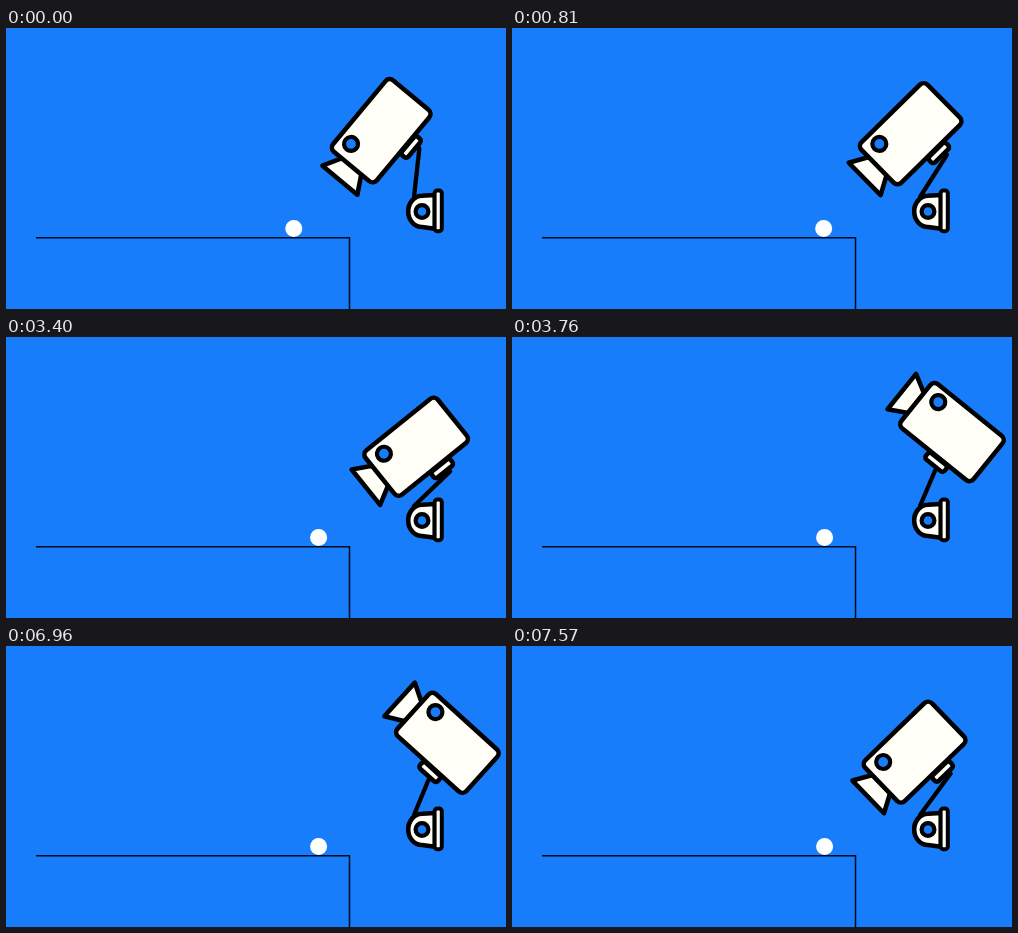
Recreate the animation shown at these times as an HTML page. Size 500 by 281 pixels, loop 8 s.

```html
<!DOCTYPE html>
<html lang="en">
<head>
<meta charset="utf-8">
<title>Camera and ball</title>
<style>
  html, body { margin: 0; width: 100%; height: 100%; overflow: hidden; background: #187dfa; }
  svg { display: block; width: 100vw; height: 100vh; }
  .ink { fill: #fffff8; stroke: #000; stroke-width: 4.6; stroke-linejoin: round; }
  .eye { fill: #187dfa; stroke: #000; stroke-width: 4.2; }
  .edge { fill: none; stroke: #020a1c; stroke-width: 1.5; }
  #arm { stroke: #000; stroke-width: 4.3; stroke-linecap: round; }
</style>
</head>
<body>
<svg viewBox="0 0 500 281">
  <path class="edge" d="M30 209.8H343.5V281"/>
  <circle id="ball" cy="200.4" r="8.5" fill="#fff"/>
  <line id="arm" x1="408" y1="169"/>
  <g id="base">
    <path class="ink" d="M429 167L416 167.8A13.8 15.6 0 0 0 416 199L429 200.8Z"/>
    <rect class="ink" x="428.6" y="162.6" width="7.2" height="40.6" rx="2.6" style="stroke-width:4"/>
    <circle class="eye" cx="416" cy="183.5" r="6.4"/>
  </g>
  <g id="cam">
    <path class="ink" d="M-64.5 -22.7L-46 -12.5V12.5L-64.5 22.7Z"/>
    <rect class="ink" x="-46.4" y="-28.4" width="92.8" height="56.8" rx="5.5"/>
    <circle class="eye" cx="-29.5" cy="-14.7" r="7"/>
    <rect class="ink" x="-5.4" y="29.3" width="24" height="8.2" rx="3"/>
  </g>
</svg>
<script>
const LOOP = 8000;
const $ = id => document.getElementById(id);
const ball = $('ball'), arm = $('arm'), cam = $('cam');

const sine = p => (1 - Math.cos(Math.PI * p)) / 2;
const cubic = p => p < .5 ? 4 * p ** 3 : 1 - 4 * (1 - p) ** 3;
const out = p => 1 - (1 - p) ** 2.5;
const clamp = p => Math.min(1, Math.max(0, p));
const mix = (a, b, p) => a + (b - a) * p;

// Camera moves: start, end, easing, pose reached [x, y, degrees]
const rest = [375.2, 102.7, -50.2];
const moves = [
  [80, 1080, sine, [403.4, 106.3, -43.4]],
  [2050, 2440, sine, [410.1, 109.7, -38.9]],
  [3380, 3760, cubic, [440, 95.1, 38.9]],
  [4960, 5330, sine, [441.4, 96.8, 42.2]],
  [6940, 7570, cubic, [402.6, 106.1, -44]]
];

function poseAt(t) {
  let pose = rest;
  for (const [start, end, ease, to] of moves) {
    if (t < start) break;
    const p = ease(clamp((t - start) / (end - start)));
    pose = pose.map((v, i) => mix(v, to[i], p));
  }
  return pose;
}

function draw(t) {
  const [x, y, deg] = poseAt(t);
  const a = deg * Math.PI / 180, c = Math.cos(a), s = Math.sin(a);
  cam.setAttribute('transform', `translate(${x} ${y}) rotate(${deg})`);
  // The arm meets the underside of the mount
  arm.setAttribute('x2', x + 11 * c - 40.5 * s);
  arm.setAttribute('y2', y + 11 * s + 40.5 * c);
  ball.setAttribute('cx', mix(287.8, 312.6, out(clamp((t - 80) / 1000))));
}

const begin = performance.now();
function tick() {
  draw((performance.now() - begin) % LOOP);
  requestAnimationFrame(tick);
}
tick();
</script>
</body>
</html>
```
